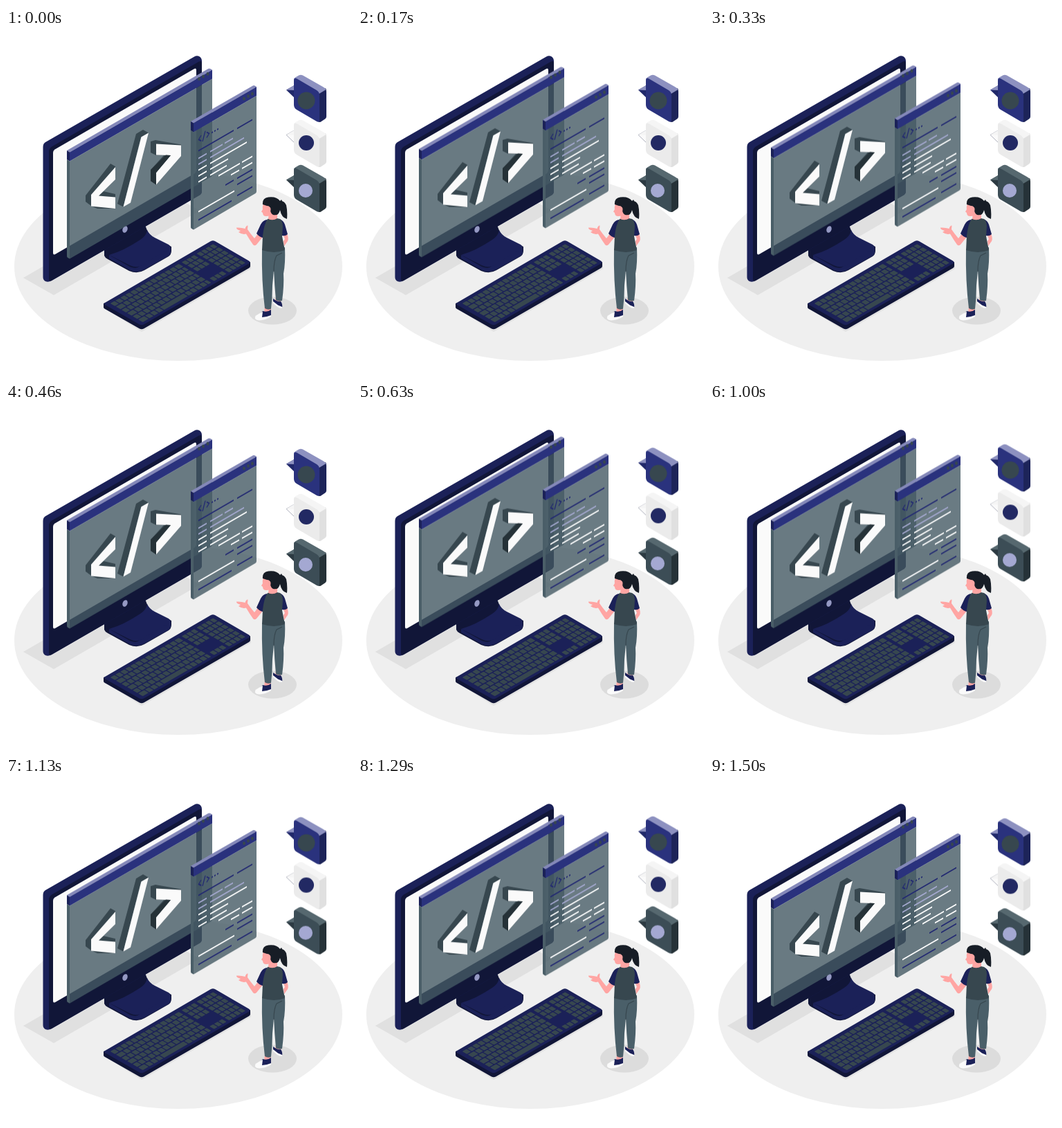
An HTML page for the animation above (1.54 s loop, 500x500 px).

```html
<!DOCTYPE html>
<html lang="en">
<head>
<meta charset="utf-8">
<title>Coding scene</title>
<style>
  html, body { margin: 0; width: 100%; height: 100%; overflow: hidden; background: #fff; }
  svg { display: block; width: 100%; height: 100%; }
  /* 1.5 s triangle wave; the badges join half a second late */
  #windows { animation: lift 1540ms linear infinite; }
  #badges { animation: late 1540ms linear infinite; }
  @keyframes lift {
    0% { transform: translateY(0); }
    48.7% { transform: translateY(-10px); }
    97.4%, 100% { transform: translateY(0); }
  }
  @keyframes late {
    0%, 32.47% { transform: translateY(0); }
    81.17% { transform: translateY(-10px); }
    100% { transform: translateY(-6.13px); }
  }
  .navy { fill: #1b2158; }
  .deep { fill: #111638; }
  .bar { fill: #2a327d; }
  .lilac { fill: #8488b9; }
  .slate { fill: #37474f; }
  .glass { fill: #455a64; fill-opacity: .8; }
  .white { fill: #fafafa; }
  .skin { fill: #ffa5a3; }
  .hair { fill: #171d26; }
  .code { fill: none; stroke-width: 2; }
</style>
</head>
<body>
<svg viewBox="0 0 500 500">
  <defs>
    <g id="badge">
      <path fill="var(--tail)" stroke="var(--line)" stroke-width=".6" d="M405 89.5L418 82V102z"/>
      <path fill="var(--top)" d="M405 89.5L416 83L418 90z"/>
      <path fill="var(--side)" d="M450 94L462 87Q463 89 463 92V128Q463 130.500 461 131.500L455 135.500Q452 137 450 134z"/>
      <path fill="var(--top)" d="M416 74Q416 72.500 418 71.500L423 68.500Q426 67 429 68.500L458 85Q461 86.500 462.500 89L452.500 95L418 77z"/>
      <path fill="var(--face)" d="M416 76Q416 71 420 73L449 90Q453 92.500 453 97V132Q453 137.500 449 135L420 118Q416 115.500 416 111z"/>
    </g>
  </defs>

  <ellipse cx="249" cy="344.500" rx="237" ry="136.500" fill="#efefef"/>
  <path fill="#e0e0e0" d="M25 361L69 386L280 264L236 239z"/>

  <g id="monitor">
    <path class="deep" d="M142 319V329Q143 332 147 334L178 351Q190 356 200 350L235 330Q239 327 239 322V316L207 300L201 285z"/>
    <path class="navy" d="M149 328Q170 322 194 306Q203 300 204 292Q207 299 215 303L235 313Q241 317 235 322L200 342Q190 348 179 343z"/>
    <path class="navy" d="M190 346L238 318V323Q238 328 234 330L200 349Q190 355 179 350L149 333V328L179 345Q186 348 190 346z"/>
    <path class="navy" d="M53.500 172Q53.500 167 57 165L272 41.500Q276 39 280 41.500Q283 43.500 283 48V236Q283 240 279 242L66 365Q61 368 57 366Q53.500 364 53.500 360z"/>
    <path class="deep" d="M62 179Q62 174 66 171.500L278 49Q283 46 283 51V236Q283 240 279 242L66 365Q62 367 62 363z"/>
    <path class="white" d="M68 180Q68 177 70.500 175.500L272 59Q275 57.500 275 61V206Q275 208.500 273 210L71 327Q68 328.500 68 325z"/>
    <ellipse cx="172" cy="291" rx="3.500" ry="5" transform="rotate(22 172 291)" fill="#9599c3"/>
  </g>

  <path fill="#e2e2e2" d="M141 404L196 439L354 348V340z"/>
  <path class="deep" d="M141 398V403.500Q141 405 143 406L193 434.500Q196 436 199 434.500L351 347Q353 346 353 344V338z"/>
  <path class="navy" d="M143 397L296 308Q299 306.500 302 308L351 336.500Q354 338.500 351 340.500L199 428.500Q196 430 193 428.500L143 400Q140 398.500 143 397z"/>
  <g id="keys" class="slate" transform="matrix(.866 -.5 .866 .5 143 398.500)"></g>

  <g id="windows">
    <path class="lilac" d="M88 177L292 59Q294 57.500 298 60.500L92 179.500z"/>
    <path class="navy" d="M88 177l4 2.500v13l-4-2.500z"/>
    <path class="bar" d="M92 179.500L298 60.500v13L92 192.500z"/>
    <path fill="#4a5e68" d="M88 190l4 2.500v141l-3-1.700q-1-.5-1-2z"/>
    <path class="glass" d="M92 192.500L298 73.500V212q0 2-1.500 3L92 333.500z"/>
    <g class="slate">
      <ellipse cx="279" cy="73.500" rx="2" ry="2.600"/>
      <ellipse cx="285" cy="70" rx="2" ry="2.600"/>
      <ellipse cx="291.500" cy="66.300" rx="2" ry="2.600"/>
    </g>

    <path class="slate" d="M115 242L151 196L158 200V219L134 242L141 236L158 240V261H132L123 257L115 251z"/>
    <path class="white" d="M158 201V219L134 242.500L158 244.500V261L123 257.500V241z"/>
    <path class="slate" d="M188 153L198 147L206 151.500L195 158L169.500 258.500L161 254z"/>
    <path class="white" d="M195.500 157.500L206 151.500L180 252.500L169.500 258.500z"/>
    <path class="slate" d="M209 164L216 162L253 168.500V184L217 226.500L209 221V205L228 184H217L209 180z"/>
    <path class="white" d="M217 167.500L253 169.500V185L217 226.500V209L238 184L217 183.500z"/>
    <path fill="#263238" d="M209 205L231 183.500L238 184L217 209V226.500L209 221z"/>

    <path class="lilac" d="M267 135L357 83.300Q359 82.500 362 85L271 137.500z"/>
    <path class="navy" d="M267 135l4 2.500v13l-4-2.500z"/>
    <path class="bar" d="M271 137.500L362 85v13L271 150.500z"/>
    <path fill="#4a5e68" d="M267 148l4 2.500v141l-3-1.700q-1-.5-1-2z"/>
    <path class="glass" d="M271 150.500L362 98V236q0 2-1.500 3L271 291.500z"/>
    <g class="slate">
      <ellipse cx="344" cy="102" rx="2" ry="2.600"/>
      <ellipse cx="350" cy="98.500" rx="2" ry="2.600"/>
      <ellipse cx="356" cy="95" rx="2" ry="2.600"/>
    </g>
    <g class="code" transform="translate(271 150.500) skewY(-30)">
      <path stroke="#232a72" d="M7 31H58M63 31H85M46 103H58M63 103H85M63 112H85M63 128H85M7 131H55"/>
      <path stroke="#a4a8cf" d="M7 42H19M24 42H42M45 42H57M7 50.500H19M24 50.500H73"/>
      <path stroke="#fff" d="M24 59H77M7 59H19M7 67.500H19M24 67.500H50M7 76H19M24 76H48M36 84H67M70 84H85M54 93H66M70 93H85M7 119H59"/>
      <path stroke="#232a72" stroke-width="1.500" d="M11 11L7.500 15L11 19M13 21L17 8M19 11L22.500 15L19 19"/>
      <path stroke="#232a72" d="M26 16h2M30 16h2M34 16h2"/>
    </g>
  </g>

  <g id="badges">
    <g style="--face:#2a327d;--top:#8d91c0;--side:#1d2459;--tail:#20286a;--line:none">
      <use href="#badge"/>
      <circle cx="434" cy="105" r="12.500" class="slate"/>
    </g>
    <g transform="translate(0 65)" style="--face:#ebebeb;--top:#f5f5f5;--side:#e0e0e0;--tail:#fafafa;--line:#777c90">
      <use href="#badge"/>
      <circle cx="434" cy="101" r="11" fill="#222963"/>
    </g>
    <g transform="translate(0 130)" style="--face:#3c4d56;--top:#56686f;--side:#263238;--tail:#2c3a42;--line:none">
      <use href="#badge"/>
      <circle cx="433" cy="105" r="10" fill="#a4a8d2"/>
    </g>
  </g>

  <g id="woman">
    <ellipse cx="385" cy="408.500" rx="35" ry="20" fill="#dcdcdc"/>
    <path class="skin" d="M374 402L383 403L382 412L373 413zM391 385L398 388L397 396L389 394z"/>
    <path class="navy" d="M386 391Q392 396 397 395Q400 399 399 404Q395 405 392 401L386 396z"/>
    <path class="white" d="M386 395L393 400.500L399 403V405Q394 405 391 402L386 398z"/>
    <path class="navy" d="M371 409Q378 411 383 407V416Q376 419 370 421L362 420z"/>
    <path class="white" d="M371 410Q365 413 360.500 416Q358 422 366 422.500Q376 422 383 417V415Q376 418 370 418z"/>
    <path fill="#4a5f69" d="M370 319L403 317Q404 340 401 355Q402 372 399 394Q394 396 390 393Q388 372 387 350L385 372Q385 390 383 406Q378 408 374 405Q369 365 370 319z"/>
    <path fill="none" stroke="#37474f" stroke-width="1.200" d="M387 352Q387 336 391 329L399 325"/>
    <path class="skin" d="M365 296L359 304Q353 297 349 291L349.500 285.500Q347 285 345.500 290Q340 288 333 288.500Q332.500 291 339 293L336 295Q341 299 347 297.500Q352 306 357 313Q359 315.500 362 313L371 302z"/>
    <path class="skin" d="M400 297L406 297Q409 304 407 308L402 315L401 308L403 305z"/>
    <path class="navy" d="M377 277Q371 278 368 284L362 297Q366 302 371 303L379 285zM395 276Q401 278 403 284L407 298Q404 301 399 300L394 286z"/>
    <path class="slate" d="M378 276Q387 273 396 276Q400 279 400 287L399 301L403 321Q388 327 370 321L371 300Q373 283 378 276z"/>
    <path class="skin" d="M380 267L392 268V275Q386 279 379 276z"/>
    <path class="skin" d="M373 252Q370 258 371 262L369 265.500L371 267Q371 272 376 272Q382 272 386 267L385 252z"/>
    <path class="hair" d="M371 255Q370 246 379 244.500Q391 243 396 250Q402 249 405 256Q407 265 406 276Q398 274 396 263Q394 272 386 270Q382 268 382 262Q382 257 377 257z"/>
    <path class="hair" d="M395 251L398 248L400 252z"/>
    <ellipse cx="380.500" cy="262" rx="2" ry="3" class="skin"/>
  </g>
</svg>
<script>
  const keys = document.getElementById('keys');
  const pitch = 9.3;

  function key(u, row, w = 6.8) {
    const r = document.createElementNS('http://www.w3.org/2000/svg', 'rect');
    const box = { x: u, y: 4 + row * pitch, width: w, height: 7.6, rx: .8 };
    for (const k in box) r.setAttribute(k, box[k]);
    keys.append(r);
  }

  for (let row = 0; row < 6; row++) {
    const shift = row % 2 * 3;
    key(5, row, 6.8 + shift);
    for (let i = 1; i < 13; i++) {
      if (row < 5 || i < 4 || i > 8) key(5 + i * 8.2 + shift, row);
    }
    key(5 + 13 * 8.2 + shift, row, 7.5 - shift);
    for (let i = 0; i < 3; i++) {
      if (row < 3 || row === 5) key(124 + i * 7.4, row, 6);
    }
    for (let i = 0; i < 4; i++) key(149 + i * 7.2, row, 5.8);
  }
  key(5 + 4 * 8.2 + 3, 5, 39.600);
</script>
</body>
</html>
```
